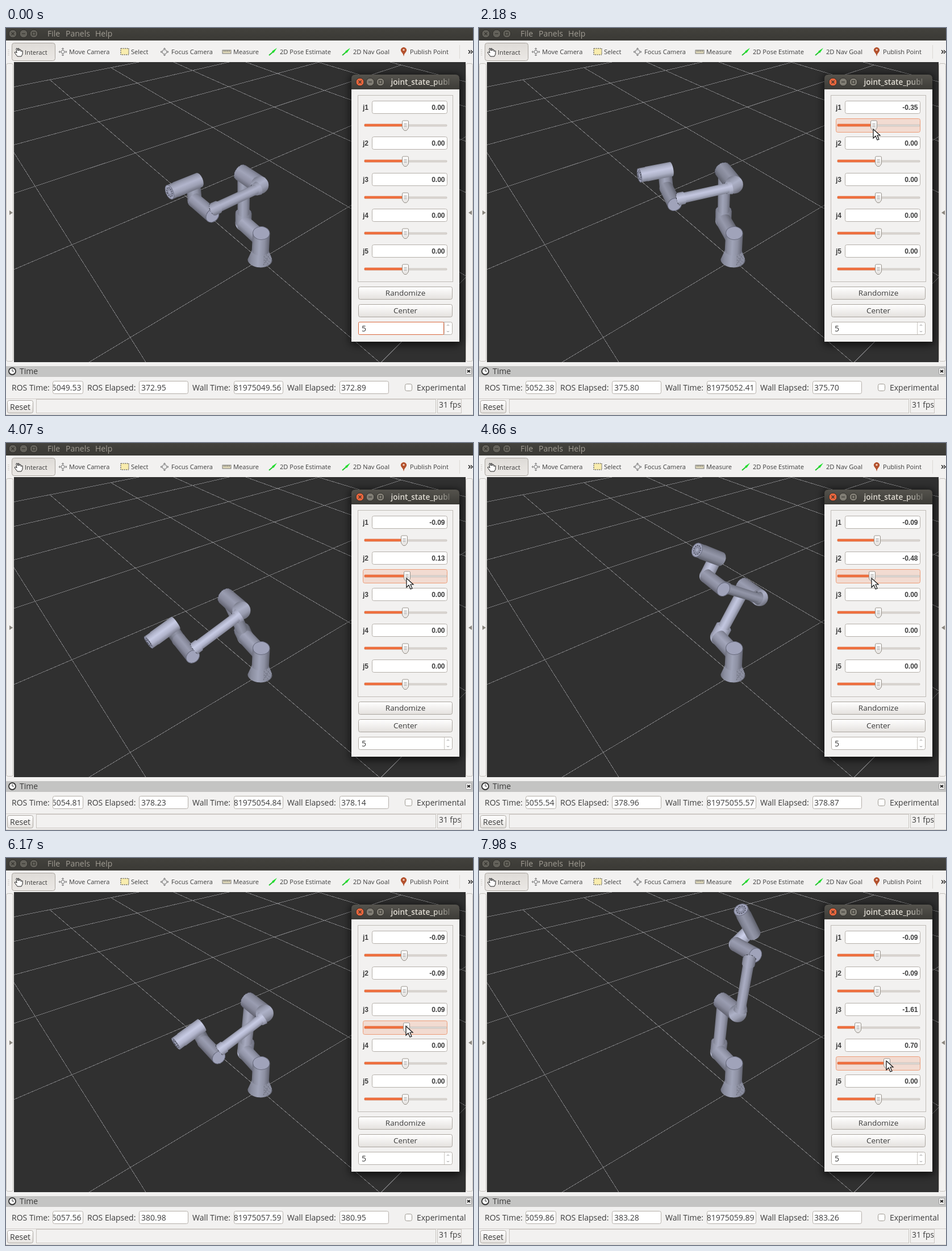
Recreate the animation shown at these times as an HTML page. Size 822 px wide and 681 px high, loop 8 s.

```html
<!DOCTYPE html>
<html lang="en">
<head>
<meta charset="utf-8">
<title>Joint sliders</title>
<style>
html, body { margin: 0; width: 100%; height: 100%; overflow: hidden; background: #f2f1f0; }
svg { display: block; width: 100%; height: 100%; }
text { font: 14px "Open Sans", "Noto Sans", sans-serif; fill: #3c3c3c; white-space: pre; }
.tool { font-size: 11.1px; }
.menu { fill: #a19d94; }
.bold { font: bold 12px "Liberation Sans", sans-serif; }
.end { text-anchor: end; }
.mid { text-anchor: middle; font-size: 13.5px; }
</style>
</head>
<body>
<svg id="stage" viewBox="0 0 822 681"></svg>
<script>
const LOOP = 8000, TICK = 50, STEP = Math.PI / 72, LAG = 100;
const stage = document.getElementById('stage');
const $ = id => document.getElementById(id);
const clamp = v => Math.min(1, Math.max(0, v));
const ease = v => v * v * (3 - 2 * v);

// ---------- timing ----------
const joints = [
  [[1400, 0], [1470, .09], [1650, .22], [2100, -.35], [2300, -.36], [2700, -.52], [3150, -.09]],
  [[3650, 0], [3880, .44], [3970, .35], [4070, .13], [4450, -.66], [4950, -.09]],
  [[5550, 0], [5950, .48], [6070, .44], [6170, .09], [6620, -1.5], [6780, -1.61]],
  [[7690, 0], [7860, .7]],
  [[0, 0]]
];
// press, release, pointer arrival, pointer height
const drags = [[1400, 3300, 800, 178], [3620, 5050, 3600, 238], [5500, 6850, 5300, 296], [7650, 8100, 7500, 357]];
const marks = [0, 1470, 2170, 4070, 5320, 6170, 7970];
const rosRun = [0, 1.89, 2.85, 5.28, 6.94, 8.03, 10.33];
const wallRun = [0, 1.92, 2.81, 5.25, 6.91, 8.06, 10.37];

function track(keys, t) {
  const i = keys.findIndex(k => k[0] >= t);
  if (i < 0) return keys[keys.length - 1][1];
  if (i === 0) return keys[0][1];
  const [t0, a] = keys[i - 1], [t1, b] = keys[i];
  return a + (b - a) * (t - t0) / (t1 - t0);
}
const notch = (j, t) => Math.round(track(joints[j], t) / STEP);
const knobX = (j, t) => 703 + Math.round(notch(j, t) * .96);
const run = (list, t) => track(marks.map((m, i) => [m, list[i]]), t);

function pointer(t) {
  let from = [808, 641], leave = 40;
  for (const [j, [press, release, arrive, y]] of drags.entries()) {
    const grip = time => knobX(j, time) - 1;
    if (t < press) {
      const k = ease(clamp((t - leave) / (arrive - leave)));
      return [from[0] + (grip(press) - from[0]) * k, from[1] + (y - from[1]) * k];
    }
    if (t < release) return [grip(t), y];
    from = [grip(release), y];
    leave = release;
  }
}

// ---------- camera: a = far left, b = far right, h = up ----------
const FOCAL = 636;
const camera = ([a, b, h]) => [
  .1446 - .624 * a + .781 * b,
  .342 - .483 * a - .386 * b - .786 * h,
  2.59 + .614 * a + .491 * b - .618 * h
];
const project = ([x, y, z]) => [411.5 + FOCAL * x / z, 324 + FOCAL * y / z];
const n1 = v => v.toFixed(1);
const pt = (x, y) => n1(x) + ' ' + n1(y);

function gridPath() {
  let d = '';
  const add = (p, q) => d += 'M' + pt(...project(camera(p))) + 'L' + pt(...project(camera(q)));
  for (let i = -5; i <= 5; i++) {
    const a0 = Math.max(-5, (-2.29 - .491 * i) / .614), b0 = Math.max(-5, (-2.29 - .614 * i) / .491);
    if (a0 < 5) add([a0, i, 0], [5, i, 0]);
    if (b0 < 5) add([i, b0, 0], [i, 5, 0]);
  }
  return d;
}

// ---------- arm ----------
function drawArm(j1, j2, j3, j4) {
  const parts = [], c = Math.cos(j1), s = Math.sin(j1);
  const place = (a, [b, h]) => camera([a * c + b * s, b * c - a * s, h]);
  const up = (o, r, f) => [o[0] - r * Math.sin(f), o[1] + r * Math.cos(f)];
  const out = (o, r, f) => [o[0] - r * Math.cos(f), o[1] - r * Math.sin(f)];

  const tone = k => `rgb(${[204, 208, 234].map(v => Math.round(v * k))})`;
  function shade(x, y, nx, ny, r, facing) {
    const id = 'g' + parts.length, k = nx * -.5 + ny * -.85 < 0 ? -r : r;
    const stops = [[0, .7], [.15, .86], [.42, 1], [.72, .88], [1, .62]];
    return [id, `<linearGradient id="${id}" gradientUnits="userSpaceOnUse" x1="${n1(x + nx * k)}" y1="${n1(y + ny * k)}" x2="${n1(x - nx * k)}" y2="${n1(y - ny * k)}">`
      + stops.map(([o, lit]) => `<stop offset="${o}" stop-color="${tone(lit * facing)}"/>`).join('') + '</linearGradient>'];
  }
  function tube(p, q, rp, rq = rp, { cap, seam } = {}) {
    const [px, py] = project(p), [qx, qy] = project(q);
    const dist = Math.hypot(qx - px, qy - py) || .01;
    const ux = (qx - px) / dist, uy = (qy - py) / dist, nx = -uy, ny = ux;
    const tilt = Math.abs(q[2] - p[2]) / Math.hypot(q[0] - p[0], q[1] - p[1], q[2] - p[2]);
    const R = rp * FOCAL / p[2], S = rq * FOCAL / q[2], turn = n1(Math.atan2(uy, ux) * 180 / Math.PI);
    const [id, def] = shade((px + qx) / 2, (py + qy) / 2, nx, ny, Math.max(R, S), Math.max(.72, Math.sqrt(1 - tilt * tilt)));
    const arc = (r, x, y) => `A${n1(r * tilt)} ${n1(r)} ${turn} 0 0 ${pt(x, y)}`;
    const rim = `${pt(qx + nx * S, qy + ny * S)}${arc(S, qx - nx * S, qy - ny * S)}`;
    let art = def + `<path fill="url(#${id})" d="M${pt(px + nx * R, py + ny * R)}L${rim}L${pt(px - nx * R, py - ny * R)}${arc(R, px + nx * R, py + ny * R)}Z"/>`;
    if (seam) art += `<path d="M${rim}" fill="none" stroke="#2b2d36" stroke-dasharray="3 2 1 3"/>`;
    if (cap) {
      // lids are slightly domed, so they look rounder than a flat disc
      const near = q[2] < p[2], x = near ? qx : px, y = near ? qy : py, r = near ? S : R;
      const width = cap === 'tool' ? tilt : Math.sqrt(tilt);
      const ring = (k, style) => `<ellipse rx="${n1(r * width * k)}" ry="${n1(r * k)}" transform="translate(${pt(x, y)}) rotate(${turn})" ${style}/>`;
      art += ring(.97, 'fill="#a0a3ba" stroke="#6a6d7f"');
      if (cap === 'tool') art += ring(.65, 'fill="#888ba0" stroke="#2e3039" stroke-dasharray="2 2"') + ring(.25, 'fill="#a4a8be"');
    }
    parts.push([(p[2] + q[2]) / 2, art]);
  }
  function ball(p, r) {
    const [x, y] = project(p), R = r * FOCAL / p[2];
    const [id, def] = shade(x, y, .5, .85, R, .85);
    parts.push([p[2], def + `<circle cx="${n1(x)}" cy="${n1(y)}" r="${n1(R)}" fill="url(#${id})"/>`]);
  }

  const fore = j2 + j3, hand = fore + j4, S = [0, .22];
  const E = up(S, .405, j2), W = out(E, .4, fore), T = up(W, .125, hand);

  tube(place(0, [0, 0]), place(0, [0, .09]), .088, .06);
  tube(place(0, [0, .09]), place(0, [0, .255]), .06, .058, { cap: 'plain' });
  tube(place(.01, [0, .205]), place(.19, S), .056);
  ball(place(.19, S), .058);
  tube(place(.19, S), place(.19, up(S, .09, j2)), .057, .057, { seam: true });
  tube(place(.19, up(S, .085, j2)), place(.19, up(S, .39, j2)), .041);
  tube(place(.035, E), place(.225, E), .056, .056, { seam: true });
  ball(place(.035, E), .055);
  tube(place(.015, out(E, .03, fore)), place(.015, out(E, .06, fore)), .043, .036, { seam: true });
  tube(place(.015, out(E, .05, fore)), place(.015, out(E, .35, fore)), .031);
  tube(place(.015, out(E, .33, fore)), place(.015, out(E, .365, fore)), .037, .037, { seam: true });
  tube(place(.16, W), place(-.028, W), .042, .042, { cap: 'plain' });
  ball(place(.15, W), .042);
  tube(place(.15, W), place(.15, T), .041, .04);
  tube(place(.15, out(T, -.04, hand)), place(.15, out(T, .11, hand)), .043, .043, { seam: true });
  tube(place(.15, out(T, .11, hand)), place(.15, out(T, .15, hand)), .041, .041, { cap: 'tool' });

  parts.sort((m, n) => n[0] - m[0]);
  $('arm').innerHTML = parts.map(p => p[1]).join('')
    + '<path d="M453 400l11-4 4 10-3 9-12 3z" fill="#8b8e9f"/><path d="M454 402l12 12m-12-6l8 8m-4-17l9 9m-14 9l11-18" stroke="#5f6270" stroke-dasharray="2 2"/>';
}

// ---------- interface ----------
const box = (x, y, w, h, fill, stroke = 'none', rx = 0, extra = '') =>
  `<rect x="${x}" y="${y}" width="${w}" height="${h}" fill="${fill}" stroke="${stroke}" rx="${rx}" ${extra}/>`;
const label = (x, y, text, cls = '', extra = '') => `<text x="${x}" y="${y}" class="${cls}" ${extra}>${text}</text>`;
const line = (d, stroke, w = 1, extra = '') => `<path d="${d}" fill="none" stroke="${stroke}" stroke-width="${w}" ${extra}/>`;
const fade = (id, from, to, dir = 'x2="0" y2="1"') =>
  `<linearGradient id="${id}" ${dir}><stop stop-color="${from}"/><stop offset="1" stop-color="${to}"/></linearGradient>`;
const field = (x, y, w, h) => box(x + .5, y + .5, w, h, '#fff', '#b4afa9', 3);
const clip = (id, x, y, w, h) => `<clipPath id="${id}">${box(x, y, w, h, '#000')}</clipPath>`;
const windowButtons = (xs, y, first, rest) => xs.map((x, i) =>
  `<circle cx="${x}" cy="${y}" r="7" fill="${i ? rest : first}" stroke="#2f2e2a"/>`
  + line(['M-2.5-2.5l5 5m0-5l-5 5', 'M-3 0h6', 'M-2.5-2.5h5v5h-5z'][i], '#35342f', 1.2, `transform="translate(${x} ${y})"`)).join('');

const greenArrow = x => line(`M${x} 48l7-6`, '#1fc62a', 2) + `<path d="M${x + 5} 41l9-6-6 9z" fill="#1fe02c"/>`;
const cross = (x, r) => line(`M${x - 7} 42h14m-7-7v14M${x - 5} 40l-2 2 2 2m10-4l2 2-2 2m-7-7l2-2 2 2m-4 10l2 2 2-2`, '#777')
  + `<circle cx="${x}" cy="42" r="${r}" fill="#ededed" stroke="#777"/>`;

const toolbar = box(0, 22, 822, 39, '#f2f1f0')
  + line('M4.500 38v10', '#c5c1bc', 2, 'stroke-dasharray="1 2"')
  + box(10.5, 26.5, 76, 31, 'url(#pressed)', '#aaa59f', 4)
  + '<path d="M18 37q0-2 2-1l1 4v-4h2v4l1-2h2v3l3-1v6l-2 4h-7l-5-7 2-1 2 2z" fill="#fff" stroke="#222"/>'
  + cross(100, 3) + box(202, 36, 14, 11, '#f8ecae', '#333', 0, 'stroke-dasharray="2 1.500"') + cross(279, 4)
  + box(381, 39, 15, 6, '#e0d9ba', '#777') + line('M384 39v3m3-3v3m3-3v3m3-3v3', '#666')
  + greenArrow(463) + greenArrow(592)
  + '<path d="M700 50q-1-5-4-8a5 5 0 1 1 8 0q-3 3-4 8z" fill="#b3512d"/><circle cx="700" cy="38.500" r="1.700" fill="#f0cdbd"/>'
  + [[33, 'Interact', 47], [111, 'Move Camera'], [220, 'Select'], [291, 'Focus Camera'], [400, 'Measure'],
     [482, '2D Pose Estimate'], [611, '2D Nav Goal'], [711, 'Publish Point']].map(([x, s, y = 46]) => label(x, y, s, 'tool')).join('')
  + line('M798.500 30v24', '#dcd9d5') + line('M814 39l3 3-3 3m4-6l3 3-3 3', '#222', 1.5);

const rowsY = [0, 1, 2, 3, 4].map(i => Math.round(63.3 * i));
const rows = rowsY.map((y, i) => `<g transform="translate(0 ${y})">`
  + label(628, 144, 'j' + (i + 1), 'bold') + field(644, 128, 132, 22)
  + label(772.5, 144, '0.00', 'bold end', `id="value${i}"`)
  + box(628.5, 159.5, 148, 24, '#f2dbd1', '#ec9c78', 3, `id="focus${i}"`)
  + box(631, 170, 145, 3, '#dcd8d4', '#bcb7b1', 1, 'stroke-width=".6"')
  + box(631, 169, 72, 4, '#f0703f', '#d96538', 1, `id="fill${i}" stroke-width=".6"`)
  + `<g id="knob${i}"><path d="M-5.500-6q0-2 2-2h7q2 0 2 2v11l-3.500 4.500h-4l-3.500-4.500z" fill="url(#button)" stroke="#99948d"/>`
  + line('M-2.500-2.500h5m-5 2.500h5m-5 2.500h5', '#aaa') + '</g></g>').join('');

const dialog = box(606, 82, 195, 476, '#000', 'none', 8, 'opacity=".65" filter="url(#blur)"')
  + '<path d="M608 108V89q0-7 7-7h176q7 0 7 7v19z" fill="url(#title)"/>'
  + windowButtons([623, 641, 659], 95, '#e9663d', '#807d74')
  + label(677.5, 100, 'joint_state_publ', '', 'style="font-size:13.600px;font-weight:600;fill:url(#titleText)" clip-path="url(#titleClip)"')
  + box(608, 108, 190, 444, '#f2f1f0') + box(619.5, 118.5, 167, 328, 'none', '#bfbbb6') + rows
  + [[455, 'Randomize'], [486, 'Center']].map(([y, s]) =>
      box(620.5, y + .5, 165, 22, 'url(#button)', '#aaa59f', 3) + label(703, y + 16, s, 'mid')).join('')
  + field(620, 517, 165, 22) + line('M771.500 518v21', '#c9c5c0')
  + line('M776 524l2-2 2 2m-4 9l2 2 2-2', '#999')
  + box(620.5, 517.5, 150, 22, '#fff', '#d9683d', 2, 'id="spin"') + label(626, 534, '5');

const panel = box(0, 588, 822, 93, '#f2f1f0') + box(0, 595, 822, 19, '#c4c4c3')
  + '<circle cx="11" cy="604" r="6" fill="#fff" stroke="#333" stroke-width="1.800"/>' + line('M11 600v4h3', '#333')
  + label(24, 609, 'Time') + box(809.5, 598.5, 10, 11, '#f2f1f0', '#999', 2) + line('M812 602l5 4m0-4l-5 4', '#222', 1.7)
  + [[10, 'ROS Time:'], [143, 'ROS Elapsed:'], [328, 'Wall Time:'], [495, 'Wall Elapsed:'], [723, 'Experimental']]
      .map(([x, s]) => label(x, 638, s)).join('')
  + [[82, 53], [234, 86], [401, 86], [587, 86]].map(([x, w]) => field(x, 621, w, 22)).join('')
  + label(132.5, 638, '', 'end', 'id="rosTime" clip-path="url(#rosClip)"') + label(238, 638, '', '', 'id="rosElapsed"')
  + label(484.5, 638, '', 'end', 'id="wallTime" clip-path="url(#wallClip)"') + label(590, 638, '', '', 'id="wallElapsed"')
  + box(702.5, 626.5, 12, 12, '#fff', '#9c978f', 3)
  + line('M0 652.500h822M0 680.500h822', '#d0ccc8')
  + box(2.5, 655.5, 45, 22, 'url(#button)', '#aaa59f', 3) + label(7, 672, 'Reset')
  + box(53.5, 653.5, 703, 24, 'none', '#c9c5c0') + box(759.5, 653.5, 42, 24, 'none', '#c9c5c0')
  + label(762, 668, '31 fps', '', 'style="font-size:13.800px"');

stage.innerHTML = '<defs>' + fade('button', '#fff', '#e4e1de') + fade('pressed', '#dedbd7', '#ece9e6')
  + fade('title', '#55534d', '#3c3b37') + fade('bar', '#43423d', '#3a3935')
  + '<linearGradient id="titleText" gradientUnits="userSpaceOnUse" x1="750" y1="0" x2="792" y2="0"><stop stop-color="#dfdbd2"/><stop offset="1" stop-color="#4a4943"/></linearGradient>'
  + '<filter id="blur" x="-20%" y="-20%" width="140%" height="140%"><feGaussianBlur stdDeviation="7"/></filter>'
  + clip('view', 14, 60, 795, 528) + clip('titleClip', 670, 84, 118, 22) + clip('rosClip', 83, 622, 52, 21) + clip('wallClip', 402, 622, 85, 21)
  + '</defs>' + box(0, 0, 822, 681, '#f2f1f0')
  + box(0, 0, 822, 22, 'url(#bar)') + windowButtons([12, 31, 49], 10, '#64625b', '#64625b')
  + label(73, 15, 'File', 'menu') + label(105, 15, 'Panels', 'menu') + label(157, 15, 'Help', 'menu') + toolbar
  + box(.5, 62.5, 12, 524, '#f2f1f0', '#c2beb9', 3) + box(809.5, 62.5, 12, 524, '#f2f1f0', '#c2beb9', 3)
  + '<path d="M6 321l6 4-6 4zM820 321l-6 4 6 4z" fill="#8a867f"/>'
  + `<g clip-path="url(#view)">${box(14, 60, 795, 528, '#303030')}${line(gridPath(), '#78787a', 1, 'shape-rendering="crispEdges"')}<g id="arm"></g></g>`
  + panel + dialog
  + '<path id="pointer" d="M0 0v16l4-4 3 7 3-1-3-7h5z" fill="#fff" stroke="#111" stroke-width="1.200"/>';

// ---------- playback ----------
let shown = -1;
function render(now) {
  const t = Math.max(0, Math.floor((now % LOOP - 20) / TICK) * TICK + 20);
  if (t === shown) return;
  shown = t;

  const active = drags.filter(d => t >= d[0]).length - 1;
  joints.forEach((_, i) => {
    const x = knobX(i, t);
    $('value' + i).textContent = (notch(i, t) * STEP).toFixed(2);
    $('fill' + i).setAttribute('width', x - 631);
    $('knob' + i).setAttribute('transform', `translate(${x} 171)`);
    $('focus' + i).style.display = i === active ? '' : 'none';
  });
  $('spin').style.display = active < 0 ? '' : 'none';

  const ros = run(rosRun, t), stamp = base => '14' + (base + ros).toFixed(2);
  $('rosTime').textContent = stamp(81975049.53);
  $('wallTime').textContent = stamp(81975049.56);
  $('rosElapsed').textContent = (372.95 + ros).toFixed(2);
  $('wallElapsed').textContent = (372.89 + run(wallRun, t)).toFixed(2);

  $('pointer').style.display = t < 40 ? 'none' : '';
  $('pointer').setAttribute('transform', `translate(${pointer(t).map(Math.round)})`);
  drawArm(...[0, 1, 2, 3].map(i => notch(i, t - LAG) * STEP));
}

const start = performance.now();
function frame() {
  render(performance.now() - start);
  requestAnimationFrame(frame);
}
frame();
</script>
</body>
</html>
```
